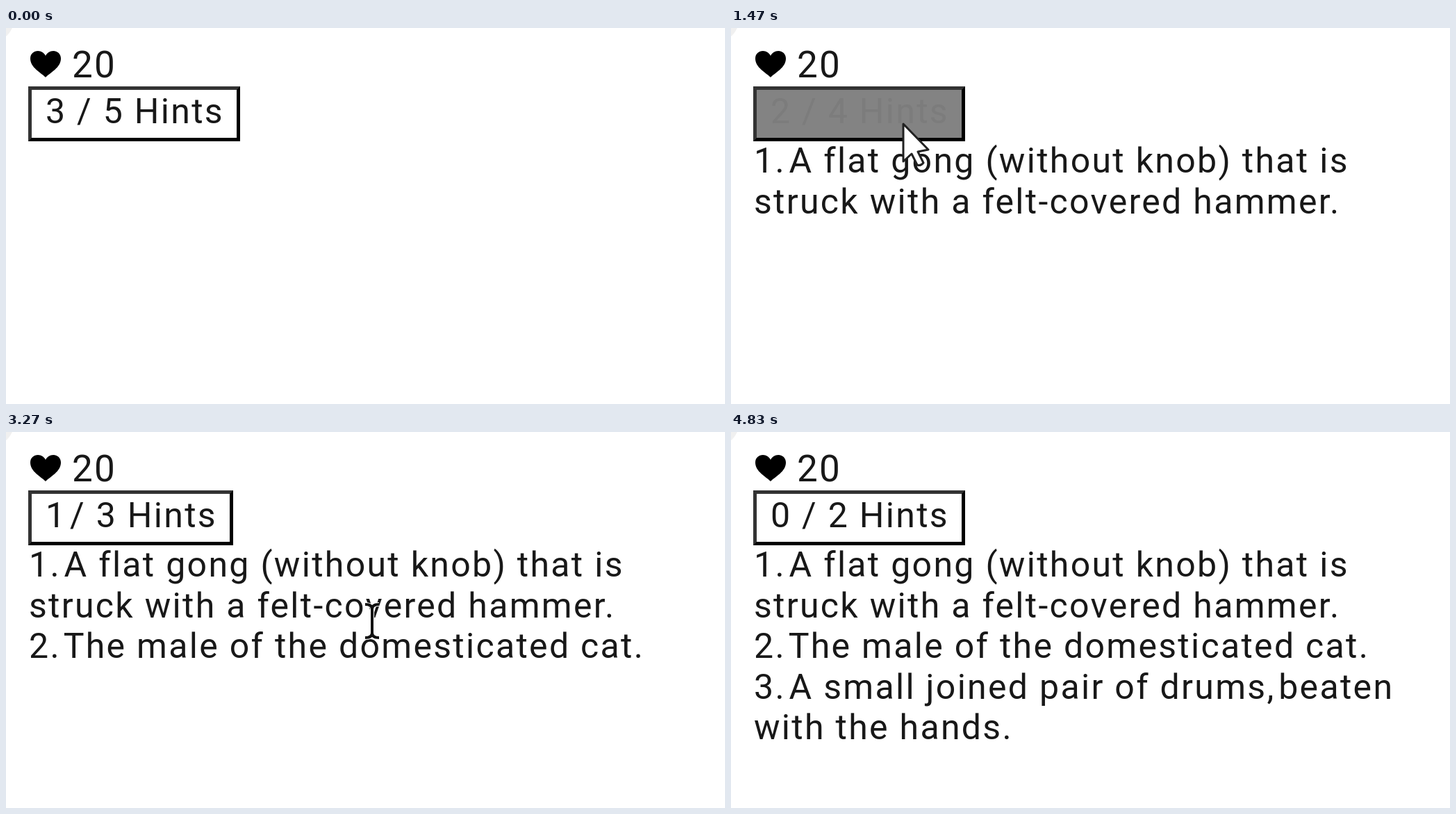
These frames come from a looping animation (1035 by 541 pixels, 5040 ms). An HTML page:

```html
<!DOCTYPE html>
<html lang="en">
<head>
<meta charset="utf-8">
<title>Hints</title>
<style>
  html, body { margin: 0; width: 100%; height: 100%; overflow: hidden; background: #fff; }
  svg { display: block; }
  text { font: 50px Roboto, sans-serif; letter-spacing: 2.3px; fill: #181818; }
  #lives { font-size: 53px; }
</style>
</head>
<body>
<svg width="1035" height="541" viewBox="0 0 1035 541">
  <defs>
    <path id="stem" d="M-10 -24Q0 -24 0 -17Q0 -24 10 -24M0 -17V17M-10 24Q0 24 0 17Q0 24 10 24"/>
  </defs>
  <path d="M0 0H9Q5 8 0 12Z" fill="#f0f0f0"/>
  <path d="M57 71C50 64 35 57 35 44C35 37 40 33 46 33C51 33 55 36 57 40C59 36 63 33 68 33C75 33 79 38 79 44C79 57 64 64 57 71Z"/>
  <text id="lives" x="95" y="71">20</text>

  <path id="shadow"/>
  <path id="bevel"/>
  <path id="face"/>
  <text id="label" x="57" y="137"></text>

  <g id="list"></g>

  <path id="arrow" d="M0 0V54L12 43L20 59Q25 61 29 56L21 40L36 37Z"
        fill="#fff" stroke="#222" stroke-width="3" stroke-linejoin="round"/>
  <g id="beam" fill="none">
    <use href="#stem" stroke="#fff" stroke-width="6"/>
    <use href="#stem" stroke="#111" stroke-width="4"/>
  </g>
</svg>
<script>
const LOOP = 5040, STEP = 30, FADE = 300;
const LEFT = 32, TOP = 84, BOTTOM = 163, BORDER = 5, LINE = 58.5;
const $ = id => document.getElementById(id);

const hints = [
  ['1. A flat gong (without knob) that is', 'struck with a felt-covered hammer.'],
  ['2. The male of the domesticated cat.'],
  ['3. A small joined pair of drums, beaten', 'with the hands.']
];

// each visit to the button: hover begins, press, click (reveals a hint), hover ends
const visits = [
  { enter: 330, press: 630, click: 750, leave: 780 },
  { enter: 1400, press: 1710, click: 2280, leave: 2150 },
  { enter: 4020, press: 4290, click: 4440, leave: 4470 }
];

// the pointer rests at each place until the next move starts
const entry = { x: 450, y: 500 };
const moves = [
  { at: 120, time: 270, x: 232, y: 138 },
  { at: 720, time: 240, x: 598, y: 404 },
  { at: 960, time: 210, x: 283, y: 230 },
  { at: 1260, time: 210, x: 248, y: 138 },
  { at: 2250, time: 30, x: 520, y: 260 },
  { at: 3240, time: 30, x: 527, y: 272 },
  { at: 4020, time: 240, x: 200, y: 138 },
  { at: 4410, time: 300, x: 380, y: 455 }
];

const progress = (t, from, time) => Math.min(1, Math.max(0, (t - from) / time));
const smooth = u => u * u * (3 - 2 * u);
const fade = (t, from) => 1 - (1 - progress(t, from, FADE)) ** 2.5;
const gray = v => `rgb(${v},${v},${v})`;

// spaces after a 1 or punctuation are narrow
const tighten = s => s.replace(/([1.,]) /g, '$1<tspan dx="-10"> </tspan>');

function paint(id, d, fill) {
  $(id).setAttribute('d', d);
  $(id).setAttribute('fill', fill);
}

function buildList() {
  let line = 0;
  const row = s => `<text x="33" y="${208 + LINE * line++}">${tighten(s)}</text>`;
  $('list').innerHTML = hints.map(rows => `<g>${rows.map(row).join('')}</g>`).join('');
}

function drawButton(t, shown) {
  const dark = visits.reduce((sum, v) => sum + fade(t, v.enter) - fade(t, v.leave), 0);
  const pressed = visits.some(v => t >= v.press && t < v.click);
  const label = $('label');
  label.innerHTML = tighten(`${3 - shown} / ${5 - shown} Hints`);
  label.style.fill = gray(Math.max(24, Math.round(255 * dark)));

  const box = label.getBBox();
  const right = Math.round(box.x + box.width + 23);
  const [x0, y0, x1, y1] = [LEFT + BORDER, TOP + BORDER, right - BORDER, BOTTOM - BORDER];
  paint('shadow', `M${LEFT} ${TOP}H${right}V${BOTTOM}H${LEFT}Z`, pressed ? '#484848' : '#000');
  paint('bevel', `M${LEFT} ${TOP}H${right}L${x1} ${y0}H${x0}V${y1}L${LEFT} ${BOTTOM}Z`, pressed ? '#000' : '#333');
  paint('face', `M${x0} ${y0}H${x1}V${y1}H${x0}Z`, gray(Math.round(255 * (1 - dark))));
}

function drawPointer(t, textEnd) {
  let { x, y } = entry;
  for (const m of moves) {
    const u = smooth(progress(t, m.at, m.time));
    x += (m.x - x) * u;
    y += (m.y - y) * u;
  }
  const last = moves[moves.length - 1];
  const visible = t >= moves[0].at && t <= last.at + last.time;
  const shape = y > BOTTOM && y < textEnd ? 'beam' : 'arrow';
  for (const id of ['arrow', 'beam']) {
    $(id).setAttribute('transform', `translate(${x} ${y})`);
    $(id).style.display = visible && id === shape ? '' : 'none';
  }
}

function draw(time) {
  const t = Math.floor(time % LOOP / STEP) * STEP;
  const shown = visits.filter(v => t >= v.click).length;
  [...$('list').children].forEach((g, i) => g.style.display = i < shown ? '' : 'none');
  drawButton(t, shown);
  drawPointer(t, BOTTOM + LINE * hints.slice(0, shown).flat().length);
}

let start;
function tick(now) {
  start ??= now;
  draw(now - start);
  requestAnimationFrame(tick);
}
buildList();
draw(0);
requestAnimationFrame(tick);
</script>
</body>
</html>
```
